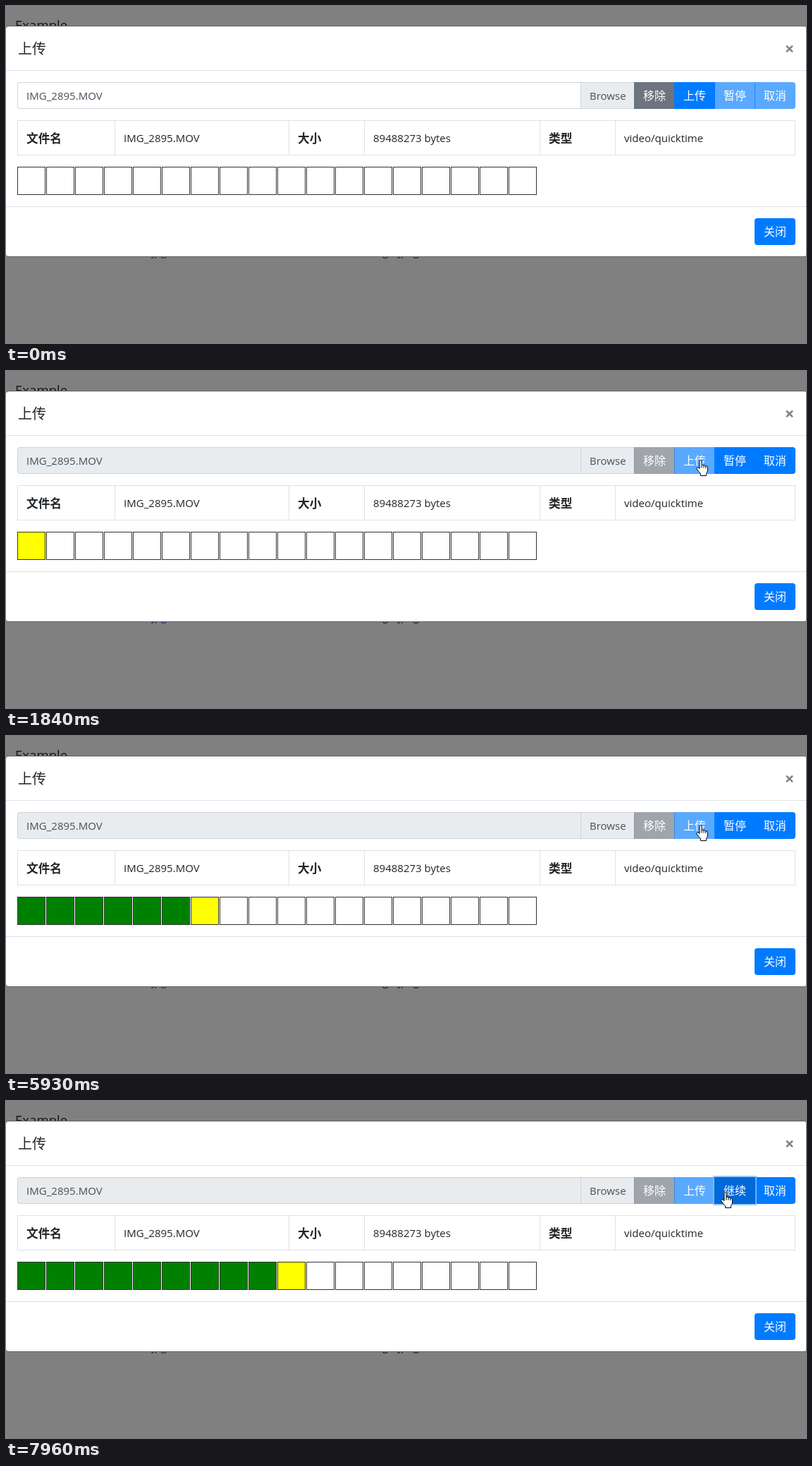
An HTML page with a canvas that plays this animation: 1135 px wide and 478 px high, repeating every 8000 ms.

```html
<!DOCTYPE html>
<html lang="zh-CN">
<head>
<meta charset="utf-8">
<title>上传</title>
<style>
  html, body { margin: 0; width: 100%; height: 100%; overflow: hidden; background: #808080; }
  canvas { display: block; }
</style>
</head>
<body>
<canvas id="stage" width="1135" height="478"></canvas>
<script>
const ctx = document.getElementById('stage').getContext('2d');
const LOOP = 8000;
const LATIN = '"Open Sans", "Noto Sans", sans-serif';
const HAN = '"Noto Sans CJK SC", "Noto Sans CJK", sans-serif';
const BLUE = '#007bff', HOVER = '#0069d9', ACTIVE = '#0062cc';

// The picture only changes at these times.
const TICKS = [0, 70, 140, 220, 290, 370, 440, 510, 750, 830, 910, 1840, 2390, 3170, 3720,
  4580, 5150, 5930, 6480, 7260, 7340, 7410, 7490, 7640, 7720, 7800, 7880, 7960];
// Each time the next chunk of the file starts uploading.
const CHUNKS = [1840, 2390, 3170, 3720, 4580, 5150, 5930, 6480, 7340, 7880];

const lerp = (a, b, p) => a + (b - a) * p;

function text(str, x, y, color, font) {
  ctx.font = font;
  ctx.fillStyle = color;
  ctx.fillText(str, x, y);
}
const latin = (str, x, y, color, size = 15) => text(str, x, y, color, `${size}px ${LATIN}`);
const han = (str, x, y, color, style = '16px') => text(str, x, y, color, `${style} ${HAN}`);

function rect(x, y, w, h, color) {
  ctx.fillStyle = color;
  ctx.fillRect(x, y, w, h);
}

function box(x, y, w, h, fill, border, radii = 0) {
  ctx.beginPath();
  ctx.roundRect(x, y, w, h, radii);
  ctx.fillStyle = border;
  ctx.fill();
  ctx.beginPath();
  ctx.roundRect(x + 1, y + 1, w - 2, h - 2, [].concat(radii).map(r => Math.max(0, r - 1)));
  ctx.fillStyle = fill;
  ctx.fill();
}

function button(label, x, y, fill, { border = fill, off = false, radii = 0 } = {}) {
  ctx.globalAlpha = off ? 0.65 : 1;
  if (fill === border) {
    ctx.beginPath();
    ctx.roundRect(x, y, 58, 38, radii);
    ctx.fillStyle = fill;
    ctx.fill();
  } else {
    box(x, y, 58, 38, fill, border, radii);
  }
  ctx.globalAlpha = 1;
  han(label, x + 13, y + 25, '#fff');
}

function backdrop() {
  rect(0, 0, 1135, 478, '#808080');
  latin('Example', 13, 34, '#101214', 18.6);
  ctx.textAlign = 'right';
  latin('.jpg', 228, 354, '#001f80');
  ctx.textAlign = 'left';
  latin('image/jpeg', 508, 354, '#101214');
}

function modal() {
  ctx.beginPath();
  ctx.roundRect(-1, 28, 1138, 328, 4.8);
  ctx.fillStyle = '#666';
  ctx.fill();
  ctx.beginPath();
  ctx.roundRect(0, 29, 1136, 326, 3.8);
  ctx.fillStyle = '#fff';
  ctx.fill();
  rect(0, 91, 1135, 1, '#dee2e6');
  rect(0, 284, 1135, 1, '#dee2e6');
  han('上传', 17, 68, '#212529', '300 20px');
  ctx.textAlign = 'center';
  text('×', 1111.5, 69, '#808080', `bold 24px ${LATIN}`);
  ctx.textAlign = 'left';
  button('关闭', 1062, 301, BLUE, { radii: 4 });
}

function table() {
  const line = '#dee2e6', ink = '#212529';
  box(16, 162, 1104, 50, '#fff', line);
  for (const x of [154, 401, 508, 757, 864]) rect(x, 162, 1, 50, line);
  const heads = [['文件名', 29], ['大小', 414], ['类型', 770]];
  for (const [label, x] of heads) han(label, x, 194, ink, 'bold 16.7px');
  latin('IMG_2895.MOV', 167, 193, ink);
  latin('89488273 bytes', 521, 193, ink);
  latin('video/quicktime', 877, 193, ink);
}

function chunks(t) {
  const started = CHUNKS.filter(c => c <= t).length;
  for (let i = 0; i < 18; i++) {
    const fill = i < started - 1 ? '#008000' : i === started - 1 ? '#ffff00' : '#fff';
    box(16 + 41 * i, 228, 40, 40, fill, '#333');
  }
}

function uploadColor(t) {
  if (t < 440) return BLUE;
  if (t < 510) return '#0072ec';
  if (t < 750) return HOVER;
  if (t < 910) return ACTIVE;
  return t < 1840 ? '#006ee5' : BLUE;
}

function toolbar(t) {
  const busy = t >= 830;
  const inputFill = !busy ? '#fff' : t < 910 ? '#fafbfb' : t < 1840 ? '#f3f5f7' : '#e9ecef';
  box(16, 108, 800, 38, inputFill, '#ced4da', [4, 0, 0, 4]);
  latin('IMG_2895.MOV', 29, 133, '#495057');
  box(815, 108, 77, 38, '#e9ecef', '#ced4da');
  latin('Browse', 828, 133, '#495057');

  const hover = t >= 7640, pressed = t === 7880, focused = t >= 7960;
  const radii = [0, 4, 4, 0];
  button('移除', 891, 108, '#6c757d', { off: busy });
  button('上传', 948, 108, uploadColor(t), { off: busy });
  if (!hover) button('暂停', 1005, 108, BLUE, { off: !busy });
  button('取消', 1062, 108, BLUE, { off: !busy, radii });
  if (hover) {
    if (focused) {
      ctx.strokeStyle = 'rgba(128,189,255,.8)';
      ctx.lineWidth = 2;
      ctx.strokeRect(1004, 107, 60, 40);
    }
    button(focused ? '继续' : '暂停', 1005, 108, pressed ? ACTIVE : HOVER, { border: ACTIVE });
  }
}

const HAND = new Path2D('M5 12.5V2Q5 .5 6.5 .5Q8 .5 8 2V7.5Q9.6 6.4 11 8Q12.7 7.2 13.8 8.8' +
  'Q16 8.4 16.5 10.5V15Q16 18 14.5 19.5V22.5H6.5V20Q4 17 1 13Q0 11.3 1.3 10.8Q3 10.3 5 12.5Z');
const KNUCKLES = new Path2D('M8 7.5V11.5M11 8V11.5M13.8 8.8V12');
const ARROW = new Path2D('M.5 .5V16.5L4.2 13L6.7 18.5L8.8 17.6L6.4 12.2H11.5Z');

function cursor(t) {
  if (t < 70) return;
  const entering = Math.min(1, (t - 70) / 440);
  const ease = 1 - (1 - entering) ** 2;
  // Hot spot: first up to the upload button, later across to pause.
  let x = lerp(1053, 985, ease), y = lerp(466, 126, ease);
  if (t >= 7260) {
    const across = Math.min(1, (t - 7260) / 460);
    x = lerp(988, 1020, Math.sin(across * Math.PI / 2));
    y = 126 + Math.round(3 * across);
  }
  const hand = y < 146;
  ctx.save();
  ctx.translate(Math.round(x) - (hand ? 6 : 0), Math.round(y));
  ctx.lineWidth = 1;
  ctx.lineJoin = 'round';
  ctx.strokeStyle = '#000';
  ctx.fillStyle = '#fff';
  const shape = hand ? HAND : ARROW;
  ctx.fill(shape);
  ctx.stroke(shape);
  if (hand) ctx.stroke(KNUCKLES);
  ctx.restore();
}

function draw(now) {
  const time = now % LOOP;
  const t = TICKS.filter(tick => tick <= time).pop() || 0;
  backdrop();
  modal();
  toolbar(t);
  table();
  chunks(t);
  cursor(t);
}

let start;
function frame(now) {
  if (start === undefined) start = now;
  draw(Math.max(0, now - start));
  requestAnimationFrame(frame);
}
draw(0);
requestAnimationFrame(frame);
</script>
</body>
</html>
```
